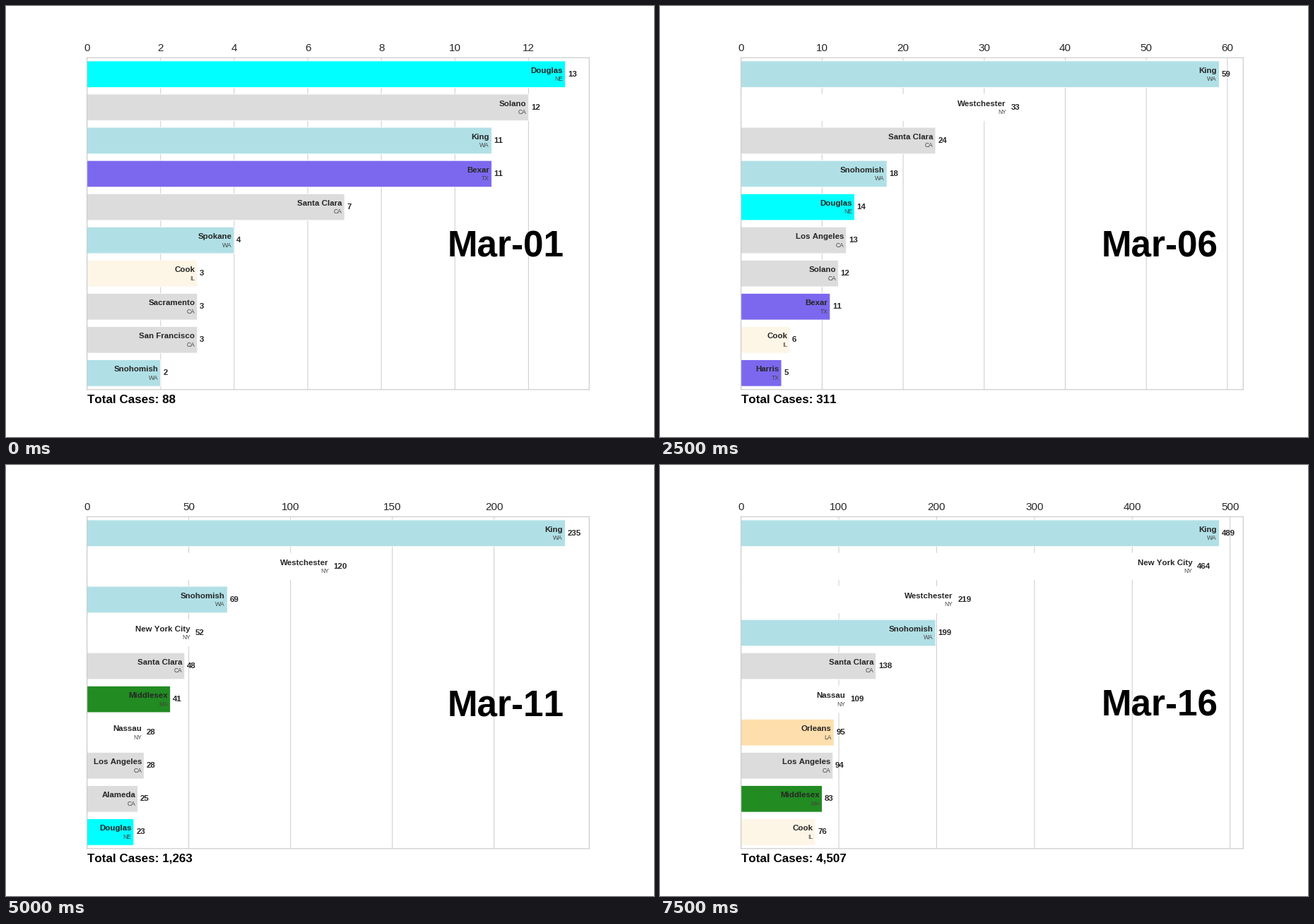
These frames come from a looping animation (917x611 px, 8 s). A matplotlib script:

```python
import numpy as np
import matplotlib.pyplot as plt
from matplotlib.animation import FuncAnimation
from matplotlib.ticker import MaxNLocator, StrMethodFormatter

W, H, DPI = 917, 611, 64
DAYS, ROWS = 16, 10
INK, GRID = "#262626", "#cccccc"

STATE_COLORS = {
    "WA": "powderblue", "CA": "gainsboro", "NE": "cyan",
    "TX": "mediumslateblue", "IL": "oldlace", "NY": "white",
    "MA": "forestgreen", "LA": "navajowhite",
}


def growth(points):
    """Exponential growth between {day: cases} key points, zero before the first."""
    days = list(points)
    logs = np.log(list(points.values()))

    def cases(day):
        return round(float(np.exp(np.interp(day, days, logs, left=-np.inf))))

    return cases


total_cases = growth({1: 88, 4: 161, 6: 311, 9: 748, 11: 1263, 13: 2224, 16: 4507})

# Ties are ranked in this order.
counties = [(name, state, growth(points)) for name, state, points in [
    ("King", "WA", {1: 11, 4: 33, 6: 59, 9: 117, 10: 191, 11: 235, 14: 389, 16: 489}),
    ("Westchester", "NY", {4: 9, 6: 33, 9: 97, 11: 120, 13: 157, 16: 219}),
    ("Snohomish", "WA", {1: 2, 4: 8, 6: 18, 9: 45, 11: 69, 13: 132, 16: 199}),
    ("Santa Clara", "CA", {1: 7, 4: 14, 6: 24, 9: 43, 11: 48, 13: 79, 16: 138}),
    ("Middlesex", "MA", {10: 41, 11: 41, 13: 60, 16: 83}),
    ("Nassau", "NY", {9: 17, 11: 28, 13: 51, 16: 109}),
    ("Orleans", "LA", {14: 53, 16: 95}),
    ("Los Angeles", "CA", {4: 7, 6: 13, 9: 19, 13: 40, 16: 94}),
    ("Cook", "IL", {1: 3, 4: 4, 6: 6, 10: 16, 13: 40, 16: 76}),
    ("Sacramento", "CA", {1: 3, 4: 3, 5: 4}),
    ("Spokane", "WA", {1: 4}),
    ("San Francisco", "CA", {1: 3, 6: 4, 9: 16}),
    ("Douglas", "NE", {1: 13, 4: 13, 9: 16, 11: 23}),
    ("Solano", "CA", {1: 12}),
    ("New York City", "NY", {7: 12, 9: 20, 11: 52, 13: 155, 16: 464}),
    ("Bexar", "TX", {1: 11}),
    ("Alameda", "CA", {9: 24, 11: 25}),
    ("Suffolk", "NY", {13: 29}),
    ("Harris", "TX", {6: 5}),
]]


def top_counties(day):
    rows = [(name, state, cases(day)) for name, state, cases in counties]
    return sorted(rows, key=lambda row: -row[2])[:ROWS]


def px(n):
    return n * 72 / DPI


plt.rcParams.update({
    "font.family": "Liberation Sans",
    "text.kerning_factor": 6,  # no kerning
    "path.snap": False,
})
fig = plt.figure(figsize=(W / DPI, H / DPI), dpi=DPI, facecolor="white")
ax = fig.add_axes([0.125, 0.11, 0.775, 0.77])
ax.set_ylim(9.498, -0.498)
ax.set_yticks([])
ax.set_axisbelow(True)
ax.grid(axis="x", color=GRID, linewidth=px(1))
ax.xaxis.set_major_locator(MaxNLocator(nbins=9, steps=[1, 2, 2.5, 5, 10]))
ax.xaxis.set_major_formatter(StrMethodFormatter("{x:,.0f}"))
ax.tick_params(axis="x", top=False, bottom=False, labeltop=True, labelbottom=False,
               length=0, pad=px(6.8), labelsize=px(15.3), labelcolor=INK)
for spine in ax.spines.values():
    spine.set(color=GRID, linewidth=px(1.2))

bars = ax.barh(range(ROWS), [1] * ROWS, height=0.8,
               edgecolor="white", linewidth=px(0.85))


def row_texts(offset, size, **style):
    return [ax.text(0, i + offset, "", size=px(size), **style) for i in range(ROWS)]


names = row_texts(0, 11.46, weight="bold", color=INK, ha="right", va="bottom")
states = row_texts(0.2, 8.5, color="#444444", ha="right", va="baseline")
values = row_texts(0, 11.46, weight="bold", color=INK, ha="left", va="center")
date = ax.text(0.95, 0.4, "", transform=ax.transAxes, size=px(51.3),
               weight="bold", color="black", ha="right")
total = ax.text(0, -0.04, "", transform=ax.transAxes, size=px(17),
                weight="bold", color="black")


def draw(frame):
    day = frame + 1
    rows = top_counties(day)
    peak = rows[0][2]
    gap = peak / 200
    ax.set_xlim(0, peak * 1.05)
    for i, (name, state, cases) in enumerate(rows):
        bars[i].set_width(cases)
        bars[i].set_facecolor(STATE_COLORS[state])
        names[i].set_text(name)
        states[i].set_text(state)
        values[i].set_text(f"{cases:,}")
        names[i].set_x(cases - gap)
        states[i].set_x(cases - gap)
        values[i].set_x(cases + gap)
    date.set_text(f"Mar-{day:02d}")
    total.set_text(f"Total Cases: {total_cases(day):,}")
    return []


anim = FuncAnimation(fig, draw, frames=DAYS, interval=500, repeat=True, repeat_delay=0)
plt.show()
```
